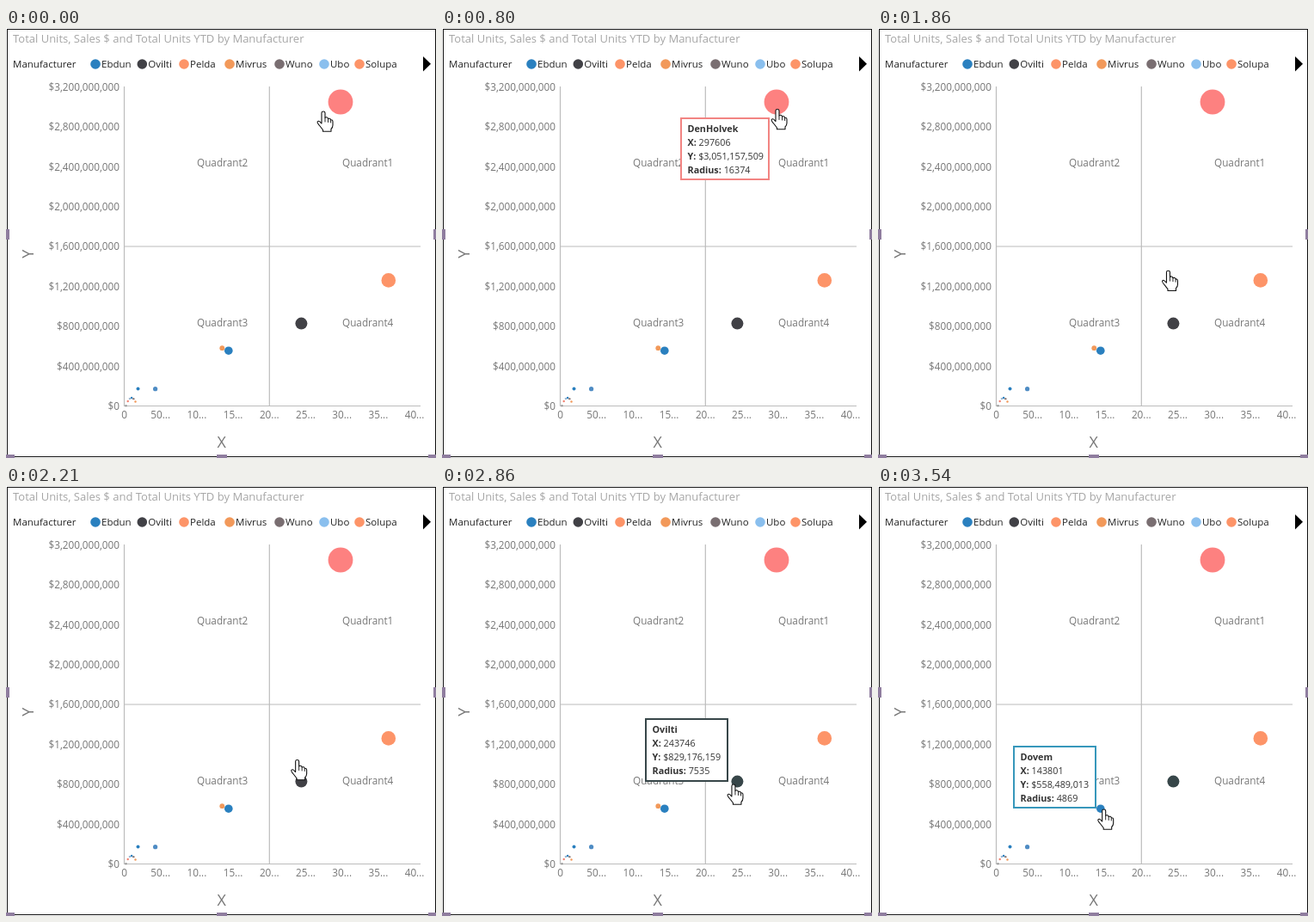
An HTML page for the animation above (4450 ms loop, 500 px wide and 500 px high).

```html
<!DOCTYPE html>
<html lang="en">
<head>
<meta charset="utf-8">
<title>Quadrant chart</title>
<style>
  html, body { margin: 0; width: 100%; height: 100%; overflow: hidden; background: #fff; }
  svg { display: block; width: 100%; height: 100%; }
  text { font: 11.75px "Open Sans", "Noto Sans", sans-serif; fill: #777; }
  .title { font-size: 13.03px; fill: #a6a6a6; }
  .legend { font-size: 11.5px; fill: #222; }
  .axis { font-size: 18px; }
  .tip text { font-size: 10.8px; fill: #333; }
  .tip tspan { font-weight: 700; }
</style>
</head>
<body>
<svg id="stage" viewBox="0 0 500 500"></svg>
<script>
const LOOP = 4450, STEP = 42.2, ROW = 46.4;
const BLUE = '#2a80bf', DARK = '#414146', SLATE = '#374649', SALMON = '#fd9468', ORANGE = '#f2995a';
const stage = document.getElementById('stage');

const text = (x, y, s, cls = '', anchor = 'start') =>
  `<text x="${x}" y="${y}" class="${cls}" text-anchor="${anchor}">${s}</text>`;
const dot = (x, y, r, fill) => `<circle cx="${x}" cy="${y}" r="${r}" fill="${fill}"/>`;
const handle = (x, y, w, h) => `<rect x="${x}" y="${y}" width="${w}" height="${h}" fill="#8f7d9f"/>`;
const repeat = (n, make) => Array.from({ length: n }, (_, i) => make(i)).join('');

const legend = [
  [104, 'Ebdun', BLUE], [158.3, 'Ovilti', DARK], [207, 'Pelda', SALMON], [260, 'Mivrus', ORANGE],
  [318, 'Wuno', '#796e71'], [370, 'Ubo', '#8abfee'], [411, 'Solupa', SALMON]
];
const bubbles = [
  [389, 86, 14.4, '#fd8180'], [444.8, 293.4, 8.3, SALMON], [251.3, 372.2, 2.9, ORANGE],
  [258.8, 375.2, 4.8, BLUE], [153.5, 419.5, 2, BLUE], [173.6, 419.7, 2.6, '#4f8cc4']
];
const specks = ['#999', '#f08070', '#9cb8d4', BLUE, '#8a7a78', ORANGE];

function speck(i) {
  const x = 139.5 + 2.2 * i;
  return dot(x, 430 + 0.22 * (x - 146) ** 2, 1.2, specks[i]);
}

// Pointer moves: start, end, number of steps, final x and y
const home = [369, 97];
const moves = [
  { start: 520, end: 800, n: 7, to: [390, 94.5] },
  { start: 1460, end: 1940, n: 11, to: [335, 291] },
  { start: 2040, end: 2360, n: 8, to: [342.3, 346] },
  { start: 2810, end: 3310, n: 11, to: [267.6, 368.5] },
  { start: 3360, end: 3540, n: 5, to: [262.7, 376] }
];

// Each tip opens late in its move and closes early in the next one
const tips = [
  { move: 0, dy: 10.5, w: 102, h: 71, color: '#f28482', rows: ['DenHolvek', '297606', '$3,051,157,509', '16374'] },
  { move: 2, dy: -75, w: 95, h: 72, color: SLATE, rows: ['Ovilti', '243746', '$829,176,159', '7535'] },
  { move: 4, dy: -73, w: 95, h: 71, color: '#3797bb', rows: ['Dovem', '143801', '$558,489,013', '4869'] }
];

function tipMarkup({ w, h, color, rows: [name, ...values] }) {
  const labels = ['X:', 'Y:', 'Radius:'];
  const lines = [`<tspan>${name}</tspan>`, ...values.map((v, i) => `<tspan>${labels[i]}</tspan> ${v}`)];
  return `<g class="tip"><rect width="${w}" height="${h}" fill="#fff" stroke="${color}" stroke-width="2"/>` +
    lines.map((s, i) => text(7.5, 16.3 + 16 * i, s)).join('') + '</g>';
}

const hand = `<g id="hand" stroke="#111" stroke-linecap="round" stroke-linejoin="round">
  <path fill="#fff" stroke-width="1.1" d="M-2 13V1.8Q-2 0 0 0Q2 0 2 1.8V7.5Q2.5 6.5 4 6.8
    Q5.3 7 5.5 8.5Q8 7.6 8.6 9.7Q11 9.5 11 12V16Q11 18.5 9 20.5V23.3H-.5V21.5L-4 17Q-7.5 13 -6.8 12
    Q-5.5 10.2 -3.4 12.6L-2 14"/>
  <path fill="none" stroke-width=".9" d="M2 8V12M5.5 8.5V12.5M8.6 9.8V13"/></g>`;

stage.innerHTML =
  '<rect x="1.5" y="1.5" width="498" height="497" fill="#fff" stroke="#111"/>' +
  [0, 497].map(x => handle(x, 234, 4, 12)).join('') +
  [-2, 245, 491].map(x => handle(x, 496, 12, 4)).join('') +
  text(8, 17, 'Total Units, Sales $ and Total Units YTD by Manufacturer', 'title') +
  text(8, 46, 'Manufacturer', 'legend') +
  legend.map(([x, s, c]) => dot(x, 42, 5.8, c) + text(x + 7, 46, s, 'legend')).join('') +
  '<path d="M485 33L494 41.7L485 50.5Z"/>' +
  '<path d="M137.5 68V440M137 439.5H482M306.3 68V440M137 254H482" fill="none" stroke="#bcbcbc" stroke-width="1.2"/>' +
  repeat(9, i => text(132, 72.8 + ROW * i, '$' + ((8 - i) * 4e8).toLocaleString('en-US'), '', 'end')) +
  repeat(9, i => text(137.5 + STEP * i, 454, i ? (i > 1 ? 5 * i : 50) + '...' : '0', '', 'middle')) +
  text(250.7, 488, 'X', 'axis', 'middle') +
  `<g transform="translate(32 262.7) rotate(-90)">${text(0, 0, 'Y', 'axis', 'middle')}</g>` +
  repeat(4, i => text(i % 3 ? 222 : 391, i < 2 ? 161 : 347, 'Quadrant' + (i + 1))) +
  bubbles.map(b => dot(...b)).join('') +
  repeat(specks.length, speck) +
  `<g id="dark">${dot(343.4, 343.6, 7, 'inherit')}</g>` +
  tips.map(tipMarkup).join('') + hand;

const tipNodes = [...stage.querySelectorAll('.tip')];
const handNode = document.getElementById('hand');
const darkNode = document.querySelector('#dark circle');

const ease = p => p ** 3 * (10 - 15 * p + 6 * p * p);
const place = (node, x, y) => node.setAttribute('transform', `translate(${x} ${y})`);

// Share of a move done at time t, in whole steps
function progress({ start, end, n }, t) {
  if (t < start) return 0;
  const step = Math.floor((t - start) / (end - start) * (n - 1) + 1e-6);
  return Math.min(n, step + 1) / n;
}

function draw(t) {
  const done = moves.map(m => progress(m, t));
  let [x, y] = home;
  const trail = moves.map(({ to }, i) => {
    const k = ease(done[i]);
    x += (to[0] - x) * k;
    y += (to[1] - y) * k;
    return [x, y];
  });
  place(handNode, x, y);
  tips.forEach(({ move, dy, w }, i) => {
    const [tx, ty] = trail[move];
    const shown = done[move] >= 0.6 && !(done[move + 1] > 0.2);
    place(tipNodes[i], Math.round(tx - w - 10), Math.round(ty + dy));
    tipNodes[i].style.display = shown ? '' : 'none';
  });
  darkNode.setAttribute('fill', done[2] >= 0.6 ? SLATE : DARK);
}

const begin = performance.now();
function tick() {
  draw((performance.now() - begin) % LOOP);
  requestAnimationFrame(tick);
}
tick();
</script>
</body>
</html>
```
